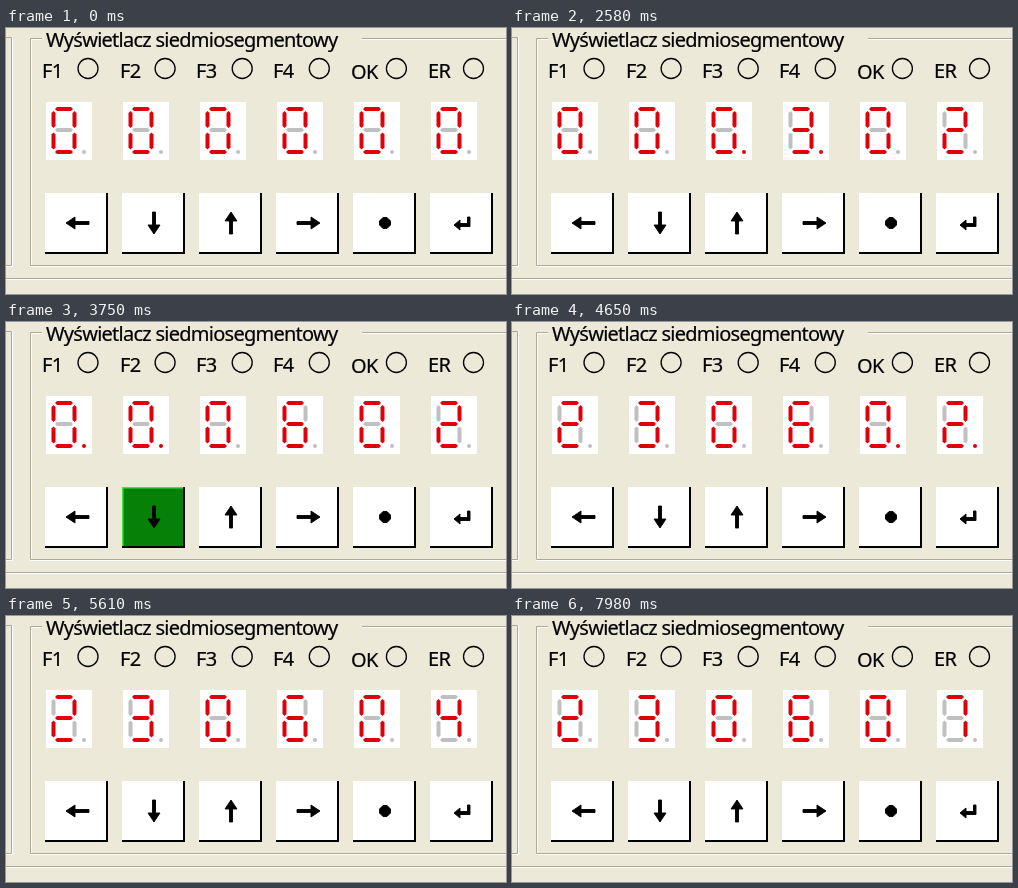
An HTML page for the animation above (8 s loop, 500 by 266 pixels).

```html
<!DOCTYPE html>
<html lang="pl">
<head>
<meta charset="utf-8">
<title>Wyświetlacz siedmiosegmentowy</title>
<style>
html, body { margin: 0; width: 100%; height: 100%; overflow: hidden; background: #ece9d8; }
svg { display: block; width: 500px; height: 266px; }
text { font: 20px "Noto Sans", "Open Sans", sans-serif; letter-spacing: -.74px; fill: #000; stroke: #000; stroke-width: .2; }
.edge { fill: none; stroke: #aca899; }
.shine { fill: none; stroke: #fff; }
.lamp { fill: none; stroke: #000; stroke-width: 1.3; }
.seg { fill: #c0c0c0; }
.seg.on { fill: #e0000a; }
.face { fill: #fff; }
.rim { fill: none; stroke: #fff; stroke-width: 1.5; }
.icon { stroke: #000; stroke-width: .9; }
.down .face { fill: #068006; }
.down .rim { stroke: #3be83b; }
</style>
</head>
<body>
<svg id="panel" viewBox="0 0 500 266">
  <path class="shine" d="M6.5 9V238.5H0M25.5 238V11.5H36M356 11.5H500M24 238.5H500M0 251.5H500"/>
  <path class="edge" d="M0 9.5H5.5V237.5H0M36 10.5H24.5V237.5H500M356 10.5H500M0 250.5H500"/>
  <text x="40" y="19">Wyświetlacz siedmiosegmentowy</text>
</svg>
<script>
const LOOP = 8000, PRESS = 120, PITCH = 77;
const panel = document.getElementById('panel');

function add(parent, tag, attrs, text) {
  const el = document.createElementNS('http://www.w3.org/2000/svg', tag);
  for (const k in attrs) el.setAttribute(k, attrs[k]);
  if (text) el.textContent = text;
  parent.appendChild(el);
  return el;
}

// Segment bars as [x, y, length, rotation], in order a to g
const BARS = [
  [18, 7, 18, 0], [28.5, 17.5, 17, 90], [28.5, 39, 17, 90], [18, 50, 18, 0],
  [7.5, 39, 17, 90], [7.5, 17.5, 17, 90], [18, 28, 18, 0]
];
const GLYPHS = ['abcdef', 'bc', 'abdeg', 'abcdg', 'bcfg', 'acdfg', 'acdefg', 'abc', 'abcdefg', 'abcdfg'];
const LABELS = ['F1', 'F2', 'F3', 'F4', 'OK', 'ER'];
const LABEL_X = [36, 114, 190, 267, 345, 422];
const ICONS = [
  'M-11 0L-2-6V-1.5H12V1.5H-2V6Z',
  'M0 11L-6 2H-1.5V-11H1.5V2H6Z',
  'M0-11L6-2H1.5V11H-1.5V-2H-6Z',
  'M12 0L3 6V1.5H-11V-1.5H3V-6Z',
  'M-5.5-2L-2-5.5H2L5.5-2V2L2 5.5H-2L-5.5 2Z',
  'M-8 2L-2-3V.5H5.5V-6H8V3.5H-2V7Z'
];

function makeDigit(x) {
  const g = add(panel, 'g', { transform: `translate(${x} 74)` });
  add(g, 'rect', { width: 46, height: 58, fill: '#fff' });
  const segs = BARS.map(([cx, cy, len, rot]) => {
    const h = len / 2, b = h - 2;
    return add(g, 'path', {
      class: 'seg',
      d: `M${-h} 0L${-b}-2H${b}L${h} 0L${b} 2H${-b}Z`,
      transform: `translate(${cx} ${cy}) rotate(${rot})`
    });
  });
  const dot = add(g, 'circle', { class: 'seg', cx: 38, cy: 50, r: 2 });
  return { segs, dot };
}

function makeButton(x, icon) {
  const g = add(panel, 'g', { transform: `translate(${x} 165)` });
  add(g, 'rect', { width: 63, height: 61, fill: '#000' });
  add(g, 'rect', { class: 'face', width: 61, height: 59 });
  add(g, 'path', { class: 'rim', d: 'M.75 59V.75H61' });
  add(g, 'path', { class: 'icon', d: icon, transform: 'translate(32 30)' });
  return g;
}

const digits = [], buttons = [];
LABELS.forEach((label, i) => {
  const x = 39 + i * PITCH;
  add(panel, 'text', { x: LABEL_X[i], y: i === 4 ? 51 : 50 }, label);
  add(panel, 'circle', { class: 'lamp', cx: 82 + i * 77.1, cy: 40.5, r: 10 });
  digits.push(makeDigit(x + 1));
  buttons.push(makeButton(x, ICONS[i]));
});

// A clock that stands still while its fields are being set
const LEFT = 0, DOWN = 1, UP = 2, RIGHT = 3, ENTER = 5;
const TICKS = [510, 1500, 5850, 6840, 7830];
const PRESSES = [
  [1510, ENTER], [1650, RIGHT],
  [2100, UP], [2280, UP], [2440, UP], [2640, UP], [2910, UP], [3090, UP],
  [3360, LEFT], [3750, DOWN], [4170, RIGHT], [4500, RIGHT],
  [4770, UP], [5130, UP], [5460, ENTER]
];
const LIMITS = [24, 60, 60];

function stateAt(t) {
  const time = [0, 0, TICKS.filter(at => at <= t).length];
  let field = -1, held = -1;
  for (const [at, key] of PRESSES) {
    if (t < at) break;
    if (t < at + PRESS) { held = key; break; }
    if (key === ENTER) field = field < 0 ? 0 : -1;
    else if (key === LEFT) field--;
    else if (key === RIGHT) field++;
    else time[field] = (time[field] + (key === UP ? 1 : -1) + LIMITS[field]) % LIMITS[field];
  }
  return { time, field, held };
}

function draw(t) {
  const { time, field, held } = stateAt(t);
  const shown = time.map(n => String(n).padStart(2, '0')).join('');
  digits.forEach(({ segs, dot }, i) => {
    const lit = GLYPHS[shown[i]];
    segs.forEach((s, k) => s.classList.toggle('on', lit.includes('abcdefg'[k])));
    dot.classList.toggle('on', i >> 1 === field);
  });
  buttons.forEach((b, i) => b.classList.toggle('down', i === held));
}

const start = performance.now();
function frame(now) {
  draw(Math.max(0, now - start) % LOOP);
  requestAnimationFrame(frame);
}
draw(0);
requestAnimationFrame(frame);
</script>
</body>
</html>
```
